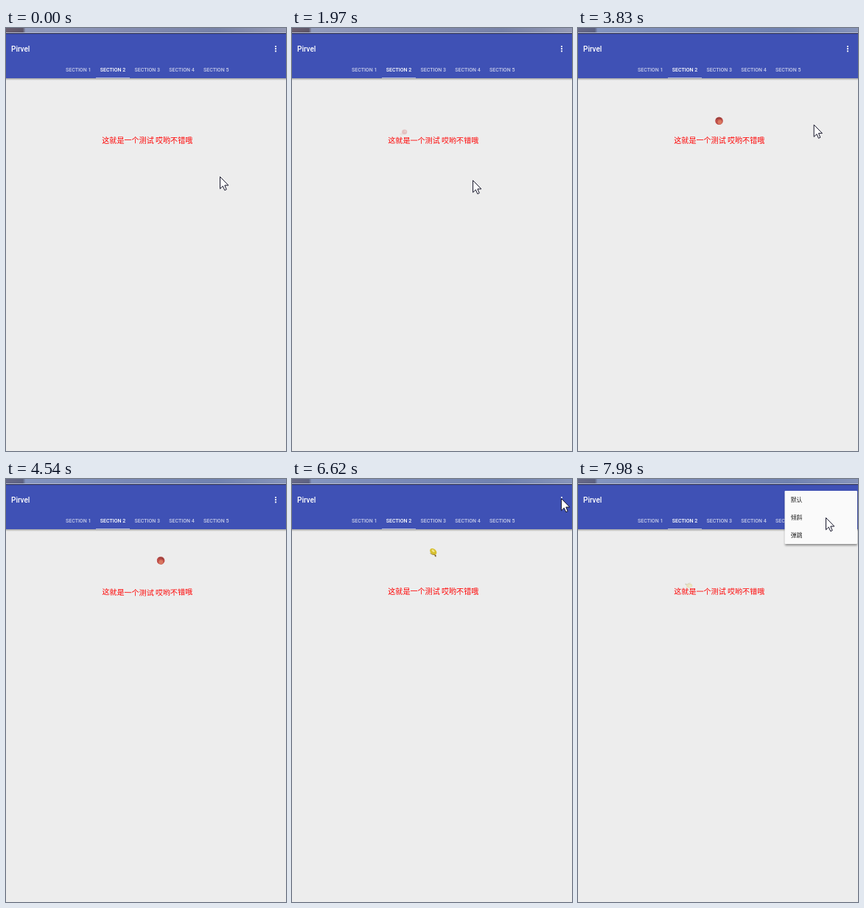
An HTML page for the animation above (8 s loop, 380 by 573 pixels).

```html
<!DOCTYPE html>
<html lang="zh-CN">
<head>
<meta charset="utf-8">
<style>
html, body { margin: 0; width: 100%; height: 100%; overflow: hidden; background: #ededed; }
svg { display: block; width: 380px; height: 573px; }
text { font-family: Roboto, "Noto Sans CJK SC", "Noto Sans CJK", sans-serif; }
.title { font-size: 10px; font-weight: 500; fill: #fff; }
.tab { font-size: 7px; font-weight: 500; fill: #fff; fill-opacity: .7; text-anchor: middle; }
.tab.on { fill-opacity: 1; }
.label { font-family: "Noto Sans CJK SC", "Noto Sans CJK", sans-serif; font-size: 10.06px; fill: #f00; text-anchor: middle; }
.item { font-size: 7.9px; font-weight: 500; fill: #222; }
</style>
</head>
<body>
<svg viewBox="0 0 380 573">
  <defs>
    <linearGradient id="strip">
      <stop offset="0" stop-color="#6a5f70"/><stop offset=".06" stop-color="#5d5668"/>
      <stop offset=".07" stop-color="#929cbd"/><stop offset=".4" stop-color="#858db2"/>
      <stop offset=".75" stop-color="#7782a8"/><stop offset="1" stop-color="#969bb5"/>
    </linearGradient>
    <linearGradient id="drop" x2="0" y2="1">
      <stop offset="0" stop-color="#000" stop-opacity=".32"/><stop offset="1" stop-color="#000" stop-opacity="0"/>
    </linearGradient>
    <filter id="soft" x="-10%" y="-10%" width="120%" height="125%"><feGaussianBlur stdDeviation="1.8"/></filter>
    <path id="rope"/>
  </defs>

  <rect width="380" height="573" fill="#ededed"/>
  <rect width="380" height="7" fill="url(#strip)"/>
  <rect id="tint" width="380" height="6" fill="#5f83c4" opacity=".2"/>
  <rect y="6" width="380" height="1" fill="#b4b9cf"/>
  <rect y="7" width="380" height="1" fill="#25294a"/>
  <rect y="8" width="380" height="60" fill="#3f51b5"/>
  <rect y="68" width="380" height="3" fill="url(#drop)"/>
  <text class="title" x="7" y="32.3">Pirvel</text>
  <g id="tabs"></g>
  <rect x="122" y="67" width="46" height="1" fill="#aeb6df"/>
  <path d="M366 25v0M366 28.2v0M366 31.4v0" stroke="#fff" stroke-width="2.2" stroke-linecap="round"/>

  <text class="label"><textPath href="#rope" startOffset="50%">这就是一个测试 哎哟不错哦</textPath></text>

  <g id="fruits">
    <g>
      <ellipse cx="-3.4" cy="2.6" rx="3" ry="2.2" fill="#e3c3b8"/>
      <ellipse cx="1.5" cy="-1" rx="4.4" ry="4.2" fill="#cf4f52"/>
      <ellipse cx="2.6" cy="-2" rx="1.5" ry="1.5" fill="#e58b82"/>
    </g>
    <g>
      <ellipse rx="5.3" ry="5.3" fill="#bd4d48"/>
      <ellipse cx="1" cy="1.8" rx="3" ry="3" fill="#d9775f"/>
      <path d="M-4 -2Q-1 -5 3 -3" fill="none" stroke="#8c3c38" stroke-width="1.2"/>
    </g>
    <g>
      <path d="M1.5 2L4 3.5L4 6L2.5 5.5Z" fill="#75592b"/>
      <ellipse cx="-.5" cy="-1" rx="5.2" ry="3.7" transform="rotate(40)" fill="#d6bf2f"/>
      <ellipse cx="-1.4" cy="-1.8" rx="2.4" ry="1.3" transform="rotate(40)" fill="#f0e487"/>
      <path d="M-4 1Q-1 3.6 2.5 3" fill="none" stroke="#9a8128" stroke-width=".9"/>
    </g>
  </g>

  <g id="menu">
    <rect x="281" y="18" width="98" height="72" fill="#000" opacity=".42" filter="url(#soft)"/>
    <rect x="280.5" y="16" width="98.5" height="72" rx="1" fill="#fafafa"/>
    <text class="item" x="288.7" y="30.9">默认</text>
    <text class="item" x="288.7" y="54.9">倾斜</text>
    <text class="item" x="288.7" y="78.9">弹跳</text>
  </g>
  <path id="cursor" d="M.5 .5V16.8L4.3 13.2L6.8 18.8L9.2 17.7L6.8 12.1H11.8Z" fill="#fff" stroke="#16162a" stroke-linejoin="round"/>
</svg>
<script>
const LOOP = 8000;
const $ = id => document.getElementById(id);
const clamp = (v, a = 0, b = 1) => Math.min(b, Math.max(a, v));
const easeOut = p => 1 - (1 - p) ** 2;

$('tabs').innerHTML = [98.2, 145, 191.8, 238.5, 285.2].map((x, i) =>
  `<text class="tab${i === 1 ? ' on' : ''}" x="${x}" y="58.9">SECTION ${i + 1}</text>`).join('');

// Moment of deepest bend, throw direction and spin for each fruit
const throws = [
  { at: 1230, dir: -1, spin: 0 },
  { at: 4150, dir: 1, spin: 60 },
  { at: 7230, dir: -1, spin: 185 }
];
const TOUCH = -0.16, DEPTH = 19;

// Pointer track: time, x, y
const track = [
  [0, 290, 201], [60, 290, 201], [61, 290, 196], [320, 290, 196], [1100, 300, 196],
  [1910, 245, 206], [1970, 245, 206], [2660, 279, 154], [3300, 279, 154],
  [4070, 338, 120], [4450, 382, 92], [4900, 382, 92], [5420, 364, 74], [5580, 364, 74],
  [5780, 348, 52], [6380, 365, 26], [7250, 365, 26], [7800, 336, 52], [8000, 336, 52]
];

function pointer(t) {
  const i = Math.max(1, track.findIndex(k => k[0] > t));
  const [a, x, y] = track[i - 1], [b, x2, y2] = track[i];
  const p = (t - a) / (b - a);
  return [x + (x2 - x) * p, y + (y2 - y) * p];
}

// u: seconds from the deepest bend
function bend(u) {
  if (u < TOUCH || u > 1) return 0;
  if (u < 0) return DEPTH * easeOut(1 - u / TOUCH);
  return DEPTH * Math.exp(-5.8 * u) * Math.cos(u / 0.39 * 2 * Math.PI);
}

function fruitY(u) {
  if (u < TOUCH) return 76 + 83.6 * Math.max(0, u + 1) ** 1.35;
  if (u < 0) return 141.5 + bend(u);
  return 160.5 - 242.5 * u + 293 * u * u;
}

function draw(t) {
  let sag = 0;
  throws.forEach(({ at, dir, spin }, i) => {
    const u = (t - at) / 1000, fly = Math.max(0, u);
    const x = 191.5 + dir * (40 * fly + 19 * fly * fly);
    const leave = clamp((u - 0.45) / 0.4);
    const g = $('fruits').children[i];
    g.setAttribute('opacity', clamp((u + 0.95) / 0.12) * (1 - leave));
    g.setAttribute('transform',
      `translate(${x} ${fruitY(u)}) rotate(${spin * fly}) scale(${1 - 0.25 * leave})`);
    sag += bend(u);
  });
  $('rope').setAttribute('d', `M120 155.8Q191.8 ${155.8 + 2 * sag} 263.6 155.8`);

  const open = clamp((t - 7030) / 200), s = 0.4 + 0.6 * easeOut(open);
  $('menu').setAttribute('opacity', open);
  $('menu').setAttribute('transform', `translate(379 16) scale(${s}) translate(-379 -16)`);
  $('cursor').setAttribute('transform', `translate(${pointer(t)})`);
  $('tint').setAttribute('opacity', t < 2890 ? 0 : 0.28);
}

const start = performance.now();
function tick() {
  draw((performance.now() - start) % LOOP);
  requestAnimationFrame(tick);
}
tick();
</script>
</body>
</html>
```
